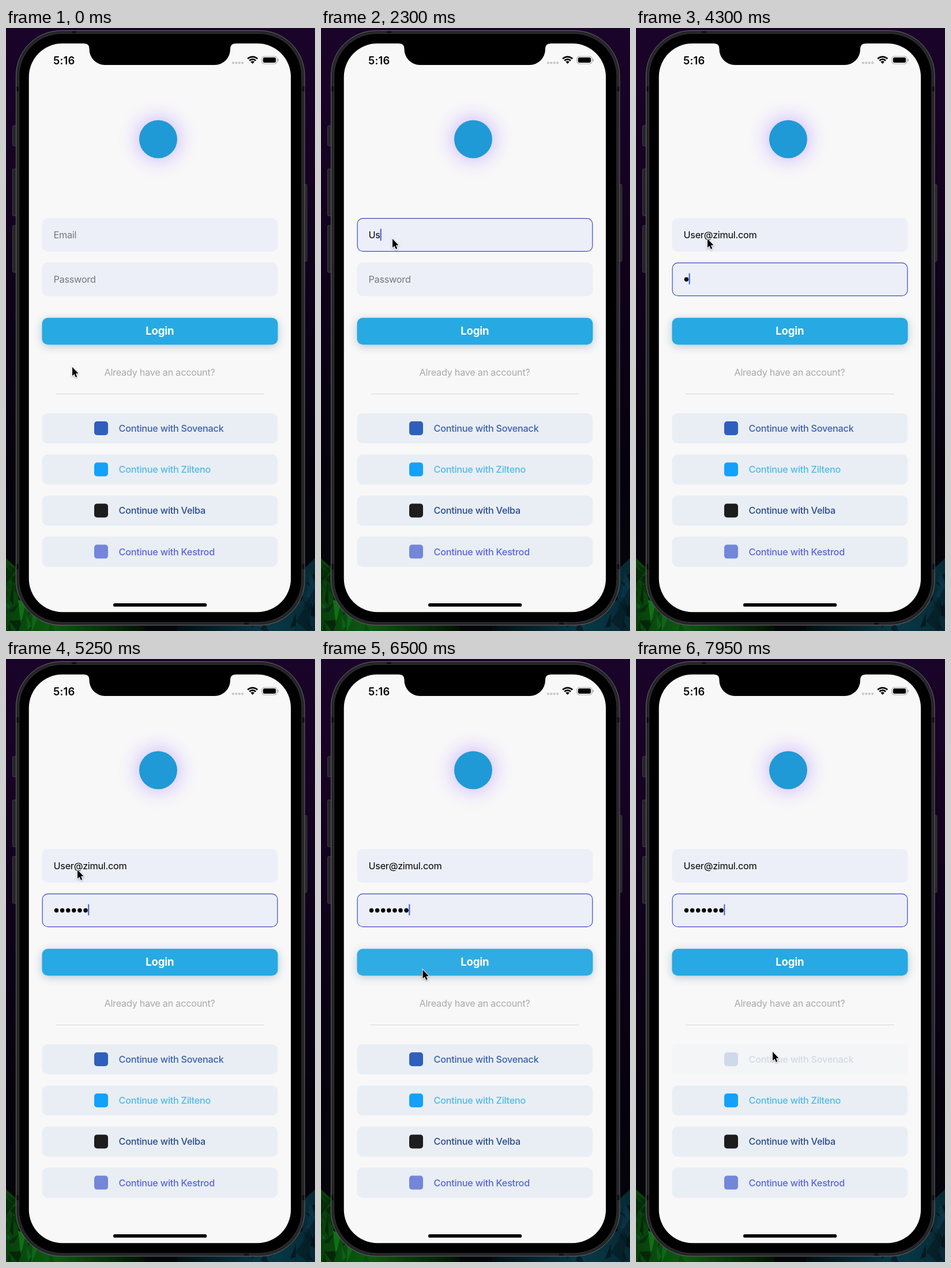
An HTML page with a canvas that plays this animation: 536x1044 px, repeating every 8 s.

```html
<!DOCTYPE html>
<html lang="en">
<head>
<meta charset="utf-8">
<title>Login screen</title>
<style>
  html, body { margin: 0; width: 100%; height: 100%; overflow: hidden; background: #07020d; }
  canvas { display: block; width: 536px; height: 1044px; }
</style>
</head>
<body>
<canvas id="stage"></canvas>
<script>
const W = 536, H = 1044, LOOP = 8000;
const PAPER = '#f8f8f8', FIELD = '#eceff8', FOCUS = '#3b4cc4', CARET = '#4a68dc';
const EMAIL = 'User@zimul.com';
const canvas = document.getElementById('stage');
const dpr = window.devicePixelRatio || 1;
canvas.width = W * dpr;
canvas.height = H * dpr;
let ctx = canvas.getContext('2d');

// Moments at which each character appears
const emailKeys = [2050, 2200, 2350, 2550, 2800, 3000, 3050, 3100, 3250, 3400, 3550, 3750, 3850, 3950];
const passKeys = [4250, 4400, 4600, 4800, 5000, 5250, 5400];
const EMAIL_FOCUS = 1600, PASS_FOCUS = 4100;

// time, x, y of the pointer tip
const pointer = [
  [50, 115, 587], [700, 124, 365], [5480, 124, 365], [5550, 135, 413],
  [5720, 135, 413], [5950, 176, 535], [6350, 176, 535], [6500, 176.5, 538],
  [7150, 176.5, 538], [7600, 279, 622], [7700, 237, 680]
];

const providers = [
  { name: 'Sovenack', ink: '#3b60ad', icon: '#2f5fbd' },
  { name: 'Zilteno', ink: '#50b9e9', icon: '#14a1fb' },
  { name: 'Velba', ink: '#2a4b8d', icon: '#1d1d1e' },
  { name: 'Kestrod', ink: '#5865e0', icon: '#7386d9' }
];

const clamp = (v, a = 0, b = 1) => Math.min(b, Math.max(a, v));
const mix = (a, b, p) => a + (b - a) * p;
const smooth = p => p * p * (3 - 2 * p);
const inOut = p => p < 0.5 ? 2 * p * p : 1 - 2 * (1 - p) * (1 - p);
const ramp = (t, start, length) => inOut(clamp((t - start) / length));
const countBefore = (keys, t) => keys.filter(k => k <= t).length;

function seeded(seed) {
  return () => (seed = (seed * 16807) % 2147483647) / 2147483647;
}

function box(x, y, w, h, r, fill, stroke, line = 1) {
  ctx.beginPath();
  ctx.roundRect(x, y, w, h, r);
  if (fill) { ctx.fillStyle = fill; ctx.fill(); }
  if (stroke) { ctx.strokeStyle = stroke; ctx.lineWidth = line; ctx.stroke(); }
}

function disc(x, y, r, fill) {
  ctx.beginPath();
  ctx.arc(x, y, r, 0, Math.PI * 2);
  ctx.fillStyle = fill;
  ctx.fill();
}

function poly(points, fill) {
  ctx.beginPath();
  points.forEach(([x, y]) => ctx.lineTo(x, y));
  ctx.closePath();
  if (fill) { ctx.fillStyle = fill; ctx.fill(); }
}

function label(str, x, y, fill, { size = 16.3, weight = 400, align = 'left', track = -0.28 } = {}) {
  ctx.font = `${weight} ${size}px Inter, "Liberation Sans", sans-serif`;
  ctx.letterSpacing = track + 'px';
  ctx.textAlign = align;
  ctx.fillStyle = fill;
  ctx.fillText(str, x, y);
  return ctx.measureText(str).width;
}

function gradient(x0, y0, x1, y1, stops) {
  const g = ctx.createLinearGradient(x0, y0, x1, y1);
  stops.forEach(([at, color]) => g.addColorStop(at, color));
  return g;
}

// Faceted crystals growing from a lower corner
function crystals(edge, dir, hue, light, seed) {
  const rnd = seeded(seed);
  const tone = l => `hsl(${hue} 78% ${l}%)`;
  poly([[edge, 918], [edge + dir * 17, 934], [edge + dir * 22, 990], [edge + dir * 62, 1012],
    [edge + dir * 240, 1036], [edge + dir * 240, H], [edge, H]],
    gradient(edge, 0, edge + dir * 240, 0, [[0, tone(light * 0.7)], [0.35, tone(light)], [1, tone(4)]]));
  for (let i = 0; i < 46; i++) {
    const reach = rnd();
    const x = edge + dir * reach * reach * 130;
    const y = 936 + rnd() * 105 + Math.abs(x - edge) * 0.3;
    const s = 14 + rnd() * 20;
    const p = () => [x + (rnd() - 0.5) * s, y + (rnd() - 0.4) * s * 1.8];
    const l = light * (0.25 + 1.7 * rnd() * rnd());
    poly([p(), p(), p()], `hsl(${hue + rnd() * 10} 72% ${l}% / .7)`);
  }
}

function drawBackdrop() {
  ctx.fillStyle = gradient(0, 0, 0, H, [
    [0, '#1a042a'], [0.25, '#150321'], [0.5, '#0c0217'], [0.75, '#05020b'], [1, '#04070a']]);
  ctx.fillRect(0, 0, W, H);
  crystals(0, 1, 124, 20, 91);
  crystals(W, -1, 194, 16, 47);
}

function drawPhone() {
  const button = (x, y, h) => box(x, y, 7, h, 1.5, '#242427', '#4b4b50', 0.8);
  button(11.5, 169, 35);
  button(11.5, 244, 81);
  button(11.5, 342, 81);
  button(515, 271, 133);
  box(17.5, 4.5, 500.5, 1029.5, 78, '#252528', '#69696d', 1);
  ctx.fillStyle = '#101012';
  for (const y of [101, 928]) {
    ctx.fillRect(18, y, 5, 9);
    ctx.fillRect(512.5, y, 5, 9);
  }
  ctx.fillRect(114, 5, 8, 5);
  ctx.fillRect(413, 1028, 8, 5);
  box(22.5, 9.5, 490.5, 1019.5, 74, '#000', '#37373a', 1);
  box(39.7, 26.8, 454.4, 984.4, 58, PAPER);

  ctx.beginPath();
  ctx.moveTo(136, 26);
  ctx.lineTo(136, 27);
  ctx.quadraticCurveTo(144.5, 27, 144.5, 36);
  ctx.arcTo(144.5, 64, 171, 64, 27);
  ctx.arcTo(389, 64, 389, 40, 27);
  ctx.lineTo(389, 36);
  ctx.quadraticCurveTo(389, 27, 398, 27);
  ctx.lineTo(398, 26);
  ctx.fillStyle = '#000';
  ctx.fill();
}

function drawStatus() {
  label('5:16', 82, 62.5, '#000', { size: 18.4, weight: 600, track: 0.2 });
  for (let i = 0; i < 4; i++) disc(394 + i * 5.4, 60.3, 2.1, '#c7c7c8');
  // Wi-Fi: two arcs and a wedge
  const from = -Math.PI * 0.75, to = -Math.PI * 0.25;
  ctx.strokeStyle = '#000';
  ctx.lineWidth = 2.7;
  for (const r of [7.6, 12]) {
    ctx.beginPath();
    ctx.arc(427.7, 61.8, r, from, to);
    ctx.stroke();
  }
  ctx.beginPath();
  ctx.moveTo(427.7, 62);
  ctx.arc(427.7, 61.8, 4.6, from, to);
  ctx.fillStyle = '#000';
  ctx.fill();
  box(444, 49.2, 26, 12.8, 4, null, '#a2a2a3', 1.1);
  box(445.9, 51.1, 22.2, 9, 2.4, '#000');
  box(471.2, 53.4, 1.6, 4.4, 0.8, '#a2a2a3');
}

function drawEmblem() {
  const glow = ctx.createRadialGradient(264, 192, 12, 264, 192, 72);
  glow.addColorStop(0, 'rgba(185,155,255,.55)');
  glow.addColorStop(0.4, 'rgba(195,170,255,.34)');
  glow.addColorStop(0.7, 'rgba(215,200,255,.14)');
  glow.addColorStop(1, 'rgba(235,228,255,0)');
  ctx.fillStyle = glow;
  ctx.fillRect(188, 116, 152, 152);
  disc(264, 192.5, 33, '#1f9ad6');
}

function drawProvider({ name, ink, icon }, y) {
  box(62.5, y, 409, 52.3, 10, '#e9eef5');
  box(153, y + 14, 24, 24, 5, icon);
  label('Continue with ' + name, 195.5, y + 32, ink, { weight: 500 });
}

function drawLogin() {
  ctx.save();
  ctx.shadowColor = 'rgba(25,85,125,.3)';
  ctx.shadowBlur = 15 * dpr;
  ctx.shadowOffsetY = 3 * dpr;
  box(62.5, 501.7, 409, 46.6, 10, '#27a9e3');
  ctx.restore();
  label('Login', 266.8, 531.3, '#fff', { size: 18.6, weight: 700, align: 'center' });
}

// Fading a group over the flat page equals veiling it with the page colour
function veil(x, y, w, h, opacity) {
  if (opacity >= 1) return;
  ctx.globalAlpha = 1 - opacity;
  ctx.fillStyle = PAPER;
  ctx.fillRect(x, y, w, h);
  ctx.globalAlpha = 1;
}

function drawField(y, focused) {
  box(62.5, y, 409, 58.2, 10, FIELD);
  if (focused) box(63.1, y + 0.6, 407.8, 57, 9.4, null, FOCUS, 1.2);
}

function drawCaret(x, y, h, t, since) {
  const p = (t - since) % 1000;
  const shown = p < 550 ? 1 : p < 900 ? 1 - clamp((p - 550) / 150) : (p - 900) / 100;
  ctx.globalAlpha = shown;
  box(x, y, 2.2, h, 1, CARET);
  ctx.globalAlpha = 1;
}

function drawForm(t) {
  const inEmail = t >= EMAIL_FOCUS && t < PASS_FOCUS;
  const inPass = t >= PASS_FOCUS;
  const typed = countBefore(emailKeys, t);
  const dots = countBefore(passKeys, t);

  drawField(329, inEmail);
  drawField(406, inPass);

  let end = 0;
  if (typed) end = label(EMAIL.slice(0, typed), 82.5, 364, '#000');
  else label('Email', 82.5, 364, '#77777b');
  if (inEmail) drawCaret(82.5 + end, 347.5, 21, t, typed ? emailKeys[typed - 1] : EMAIL_FOCUS);

  if (!dots) label('Password', 82.5, 441, '#77777b');
  for (let i = 0; i < dots; i++) disc(87.5 + i * 10.1, 435.2, 3.7, '#000');
  if (inPass) drawCaret(81.5 + dots * 10.1, 424.5, 19.5, t, dots ? passKeys[dots - 1] : PASS_FOCUS);
}

// Press fades to 0.2 in 150 ms, release returns in 250 ms
function pressed(t, down, up) {
  return t < up ? mix(1, 0.2, ramp(t, down, 150)) : mix(0.2, 1, ramp(t, up, 250));
}

function drawPointer(t) {
  let i = pointer.findIndex(k => k[0] > t);
  if (i < 0) i = pointer.length;
  const a = pointer[Math.max(0, i - 1)], b = pointer[Math.min(i, pointer.length - 1)];
  const p = b[0] > a[0] ? smooth(clamp((t - a[0]) / (b[0] - a[0]))) : 0;
  ctx.save();
  ctx.translate(mix(a[1], b[1], p), mix(a[2], b[2], p));
  poly([[0, 0], [0, 15.3], [3.4, 12.2], [5.9, 17.8], [8.3, 16.8], [5.9, 11.3], [10.5, 11]]);
  ctx.shadowColor = 'rgba(0,0,0,.35)';
  ctx.shadowBlur = 3 * dpr;
  ctx.shadowOffsetY = dpr;
  ctx.lineWidth = 2;
  ctx.strokeStyle = '#fff';
  ctx.stroke();
  ctx.shadowColor = 'transparent';
  ctx.fillStyle = '#000';
  ctx.fill();
  ctx.restore();
}

function drawFixed() {
  drawBackdrop();
  drawPhone();
  drawStatus();
  drawEmblem();
  drawLogin();
  label('Already have an account?', 266.5, 601.5, '#a9a9ab', { align: 'center' });
  ctx.fillStyle = '#d9d9da';
  ctx.fillRect(86, 633, 362, 1.1);
  providers.forEach((item, i) => drawProvider(item, 667 + i * 71.2));
  box(186, 996, 162.3, 5.8, 2.9, '#000');
}

// The unchanging picture is painted once
const fixed = document.createElement('canvas');
fixed.width = canvas.width;
fixed.height = canvas.height;
const stage = ctx;
ctx = fixed.getContext('2d');
ctx.scale(dpr, dpr);
drawFixed();
ctx = stage;
ctx.scale(dpr, dpr);

function draw(t) {
  ctx.drawImage(fixed, 0, 0, W, H);
  drawForm(t);
  const login = t < 6700 ? pressed(t, 6000, 6290) : pressed(t, 6780, 6990);
  veil(42, 480, 450, 90, login);
  veil(62, 666, 410, 54, pressed(t, 7800, LOOP));
  drawPointer(t);
}

const begun = performance.now();
function tick() {
  draw((performance.now() - begun) % LOOP);
  requestAnimationFrame(tick);
}
tick();
</script>
</body>
</html>
```
